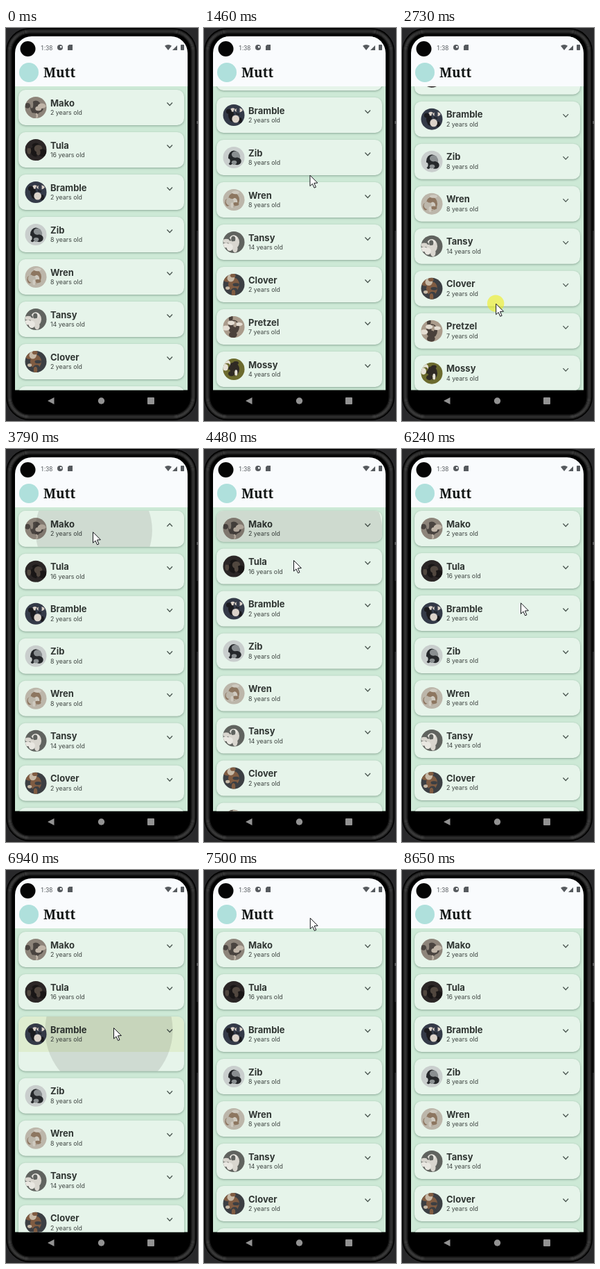
Recreate the animation shown at these times as an HTML page with a canvas. Size 277 px wide and 566 px high, loop 9.18 s.

```html
<!DOCTYPE html>
<html lang="en">
<head>
<meta charset="utf-8">
<title>Dog list</title>
<style>
html, body { margin: 0; width: 100%; height: 100%; overflow: hidden; background: #000; }
canvas { display: block; width: 277px; height: 566px; }
</style>
</head>
<body>
<canvas id="stage"></canvas>
<script>
const W = 277, H = 566, LOOP = 9180;
const canvas = document.getElementById('stage');
const dpr = window.devicePixelRatio || 1;
canvas.width = W * dpr;
canvas.height = H * dpr;
const c = canvas.getContext('2d');

const SANS = 'Inter, "Open Sans", sans-serif';
const CARD = { x: 18, w: 239, h: 51, open: 91, gap: 10, top: 89, r: 10 };
const BASE = [230, 244, 234], TINT = [219, 235, 200];
const INK = '#565a5e', PAPER = '#f9fbfd', KEYS = '#929292';

// name, age, photo tones (ground, coat, light), about
const dogs = [
  ['Mako', 2, ['#8d847a', '#4a4440', '#c0b5a8'], 'Eating treats on the terrace'],
  ['Tula', 16, ['#2b2626', '#191616', '#51473f'], 'Barking at Daddy'],
  ['Bramble', 2, ['#343a48', '#1b1b1f', '#dcd3ca'], 'Stealing socks'],
  ['Zib', 8, ['#c9cecd', '#25282b', '#8a8f91']],
  ['Wren', 8, ['#bcb6aa', '#8d7660', '#cfcac0']],
  ['Tansy', 14, ['#60635f', '#d9d6cf', '#e9e7e1']],
  ['Clover', 2, ['#3c3f43', '#805c42', '#c7b9a6']],
  ['Pretzel', 7, ['#aa9b8b', '#4a403a', '#e4ddd2']],
  ['Mossy', 4, ['#6c6b2e', '#2f2a24', '#e6e2d6']]
].map(([name, age, tones, about]) => ({ name, age, tones, about }));

// Each card is tapped once to open and once to close
const taps = [
  [0, 3690, 3770], [0, 4300, 4383],
  [1, 5040, 5120], [1, 5560, 5660],
  [2, 6330, 6410], [2, 6840, 6910]
].map(([dog, down, up], i) => ({ dog, down, up, open: i % 2 === 0 }));
const drags = [{ down: 900, up: 1300 }, { down: 2640, up: 2940 }];

// time, x, y
const path = [
  [195, 239, 501], [480, 160, 286], [900, 160, 293], [1300, 153, 185],
  [1880, 150, 330], [2020, 150, 363], [2630, 135, 383], [3020, 136, 480],
  [3690, 122, 118], [3840, 127, 120], [4270, 129, 160], [4480, 129, 160],
  [4980, 236, 158], [5120, 243, 169], [5960, 243, 170], [6330, 156, 232],
  [6930, 155, 227], [7770, 152, 16], [8160, 152, 16], [8580, 194, 511]
];

const clamp = v => Math.max(0, Math.min(1, v));
const mix = (a, b, u) => a + (b - a) * u;
const smooth = u => u * u * (3 - 2 * u);
const ease = (t, from, to) => smooth(clamp((t - from) / (to - from)));

const FIRST = 195, STEP = 70.2;
const held = t => FIRST + STEP * Math.floor((t - FIRST) / STEP);

function pointer(t) {
  const i = Math.max(1, path.findIndex(p => p[0] > t));
  const a = path[i - 1], b = path[i];
  if (t >= path[path.length - 1][0]) return path[path.length - 1].slice(1);
  const u = ease(t, a[0], b[0]);
  return [mix(a[1], b[1], u), mix(a[2], b[2], u)];
}

const scroll = t => 111 * (ease(t, 900, 1450) - ease(t, 2675, 3020));

// Remaining share of a bouncy (size) or critically damped (colour) spring
const OMEGA = Math.sqrt(1500);
function bounce(s) {
  const d = OMEGA / 2, w = OMEGA * Math.sqrt(0.75);
  return Math.exp(-d * s) * (Math.cos(w * s) + d / w * Math.sin(w * s));
}
const settle = s => Math.exp(-OMEGA * s) * (1 + OMEGA * s);

function cardState(i, t) {
  const tap = taps.filter(p => p.dog === i && p.up <= t).pop();
  if (!tap) return { h: CARD.h, tint: 0, open: false };
  const s = (t - tap.up) / 1000, to = tap.open ? 1 : 0;
  return {
    h: mix(CARD.h, CARD.open, mix(to, 1 - to, bounce(s))),
    tint: mix(to, 1 - to, settle(s)),
    open: tap.open
  };
}

function random(seed) {
  return () => {
    seed = (seed * 16807) % 2147483647;
    return seed / 2147483647;
  };
}

function box(x, y, w, h, r, fill) {
  c.beginPath();
  c.roundRect(x, y, w, h, r);
  if (fill) {
    c.fillStyle = fill;
    c.fill();
  }
}
function oval(x, y, rx, ry, fill) {
  c.beginPath();
  c.ellipse(x, y, rx, ry, 0, 0, 7);
  c.fillStyle = fill;
  c.fill();
}
const disc = (x, y, r, fill) => oval(x, y, r, r, fill);
function poly(points, fill) {
  c.beginPath();
  points.forEach(p => c.lineTo(p[0], p[1]));
  c.closePath();
  c.fillStyle = fill;
  c.fill();
}
function text(s, x, y, font, fill) {
  c.font = font;
  c.fillStyle = fill;
  c.fillText(s, x, y);
}

function avatar(i, x, y) {
  const rnd = random(4321 * (i + 1)), tones = dogs[i].tones;
  c.save();
  box(x - 15.5, y - 15.5, 31, 31, 15.5, tones[0]);
  c.clip();
  oval(x, y, 8, 10, tones[1]);
  for (let k = 0; k < 9; k++) {
    const a = rnd() * 6.3, d = 3 + rnd() * 11;
    oval(x + d * Math.cos(a), y + d * Math.sin(a), 2 + rnd() * 4, 2 + rnd() * 4, tones[k % 3]);
  }
  c.restore();
}

function ripple(tap, y, t) {
  const start = tap.up - 60, age = t - start, end = start + 225;
  const [px, py] = pointer(start);
  // Taps on the arrow leave the card itself calm
  if (px > 200 || age < 0 || t > end + 150) return;
  const u = clamp(age / 225);
  const alpha = 0.1 * clamp(age / 50) * (1 - clamp((t - end) / 150));
  disc(mix(px, 137.5, u), mix(py, y + 25, u), mix(70, 140, smooth(u)), `rgba(0,0,0,${alpha})`);
}

function card(i, y, st, t) {
  const { name, age, about } = dogs[i], { x, w, r } = CARD;
  c.save();
  c.shadowColor = 'rgba(30,60,45,.38)';
  c.shadowBlur = 3 * dpr;
  c.shadowOffsetY = dpr;
  box(x, y, w, st.h, r, `rgb(${BASE})`);
  c.restore();

  c.save();
  box(x, y, w, st.h, r);
  c.clip();
  if (st.tint > 0.01) {
    c.fillStyle = `rgb(${BASE.map((v, k) => Math.round(mix(v, TINT[k], st.tint)))})`;
    c.fillRect(x, y, w, st.open ? st.h : CARD.h);
  }
  avatar(i, 43, y + 25.5);
  text(name, 64, y + 23.5, '700 13px ' + SANS, '#303633');
  text(age + ' years old', 64, y + 36.3, '400 8.8px ' + SANS, '#3d4440');

  const dy = st.open ? -2 : 2, cy = y + 20.5;
  c.beginPath();
  c.moveTo(232.4, cy - dy);
  c.lineTo(236.2, cy + dy);
  c.lineTo(240, cy - dy);
  c.strokeStyle = '#4c5852';
  c.lineWidth = 1.3;
  c.stroke();

  if (st.open) {
    text('About:', 28, y + 65, '700 9px ' + SANS, '#303633');
    text(about, 28, y + 77, '400 9px ' + SANS, '#3d4440');
  }
  taps.filter(p => p.dog === i).forEach(p => ripple(p, y, t));
  c.restore();
}

function phone() {
  c.fillStyle = '#29292b';
  c.fillRect(0, 0, W, H);
  box(0, 0, 275, 565, 34, '#000');
  // Soft metal rim
  for (let k = 0; k < 8; k++) {
    const v = Math.round(62 * Math.sin(Math.PI * k / 8));
    box(1 + k, 1 + k, 273 - 2 * k, 563 - 2 * k, 33 - k);
    c.strokeStyle = `rgb(${v},${v},${v})`;
    c.lineWidth = 1.2;
    c.stroke();
  }
  box(275, 134, 2, 4, 0, '#5a5a5c');
  box(275, 190, 2, 102, 0, '#111');

  poly([[60, 537], [69.5, 532], [69.5, 542]], KEYS);
  disc(137.5, 537, 4.7, KEYS);
  box(204, 532, 10, 10, 1, KEYS);
}

function header() {
  box(13, 12, 249, 72, 0, PAPER);
  disc(31.5, 30, 11, '#050505');
  text('1:38', 50, 31.5, '400 9px Roboto, sans-serif', INK);
  disc(78, 28, 4, INK);
  box(78, 26, 2.5, 2.5, 0, PAPER);
  poly([[89, 26], [91, 24], [96, 24], [96, 32], [89, 32]], INK);
  c.beginPath();
  c.moveTo(234, 32);
  c.arc(234, 32, 8, -2.25, -0.89);
  c.fill();
  poly([[240, 32], [247, 25], [247, 32]], INK);
  box(252, 24, 5, 8, 0.8, INK);
  disc(33, 64, 14, '#afe0dc');
  text('Mutt', 54, 71.3, '900 19px "Noto Serif", "DejaVu Serif", serif', '#111514');
}

function cursor(t) {
  if (t < FIRST || t > 8600) return;
  const [x, y] = pointer(t);
  const pressed = [...taps, ...drags].some(p => t >= p.down && t < p.up);
  if (pressed) disc(x, y, 12.2, 'rgba(240,238,20,.58)');
  c.save();
  c.translate(x, y);
  c.lineJoin = 'round';
  poly([[0.5, 0.5], [0.5, 16], [4, 12.8], [6.6, 18.6], [9, 17.6], [6.4, 11.8], [11.4, 11.5]], '#fff');
  c.strokeStyle = '#16181c';
  c.lineWidth = 1;
  c.stroke();
  c.restore();
}

function draw(now) {
  const t = held(now % LOOP);
  c.setTransform(dpr, 0, 0, dpr, 0, 0);
  phone();
  c.save();
  box(13, 12, 249, 509.5, [24, 24, 0, 0]);
  c.clip();
  c.fillStyle = '#cde9d6';
  c.fillRect(13, 84, 249, 438);
  let y = CARD.top - scroll(t);
  dogs.forEach((dog, i) => {
    const st = cardState(i, t);
    card(i, y, st, t);
    y += st.h + CARD.gap;
  });
  header();
  c.restore();
  cursor(t);
}

const began = performance.now();
function tick() {
  draw(performance.now() - began);
  requestAnimationFrame(tick);
}
tick();
</script>
</body>
</html>
```
